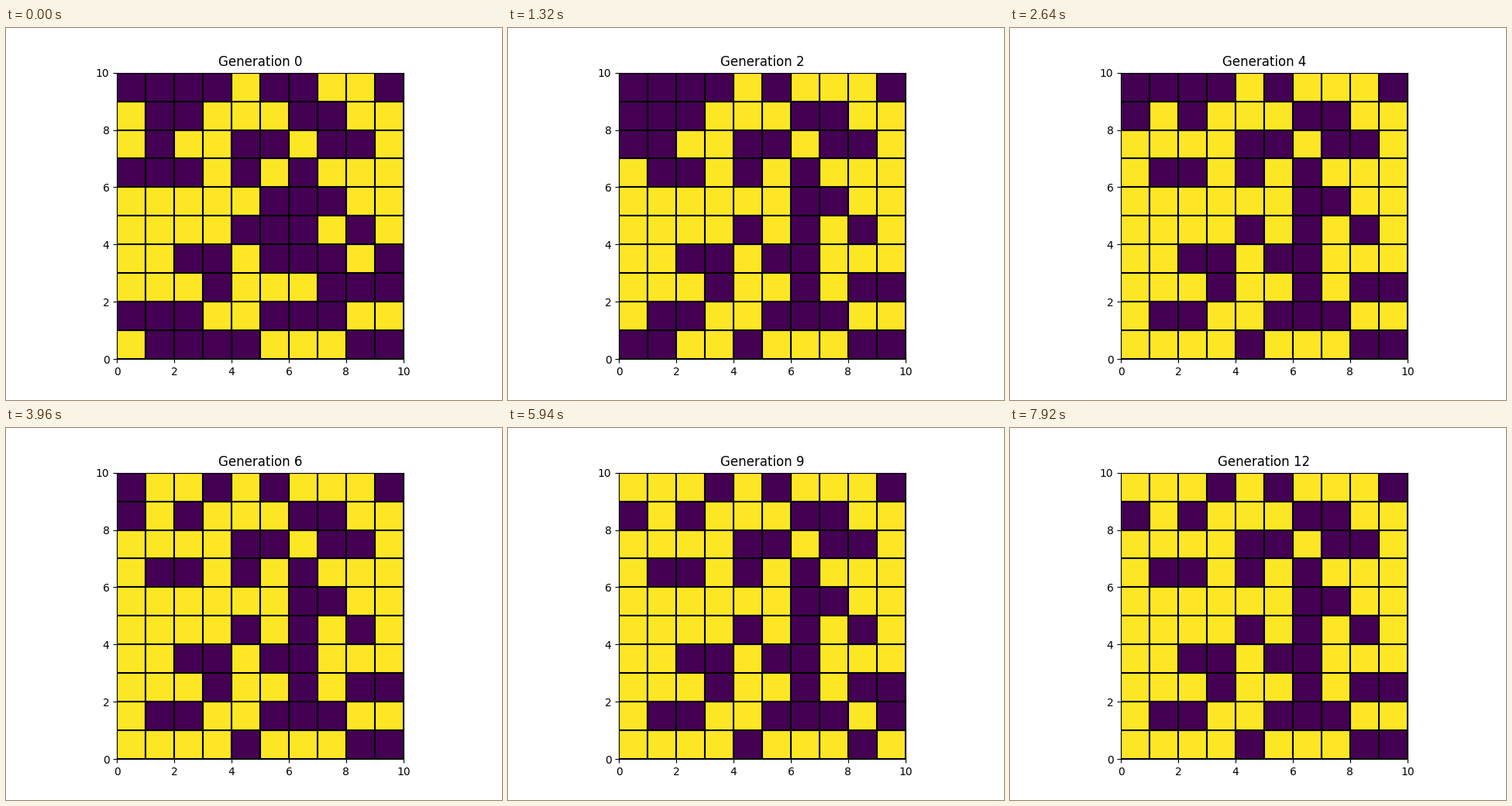
Recreate the animation shown at these times as a matplotlib script. Size 640 px wide and 480 px high, loop 8000 ms.

```python
import numpy as np
import matplotlib.pyplot as plt
from matplotlib.animation import FuncAnimation

LOOP_MS, STEP_MS, TICK_MS = 8000, 660, 20

# Top row first; "1" marks a live cell.
START = """
0000100110
1001110011
1011001001
0001010111
1111100011
1111000101
1100100010
1110111000
0001100011
1000011100
""".split()


def evolve(grid):
    """Cells die below two neighbours, are born at two, and otherwise persist."""
    rows, cols = grid.shape
    padded = np.pad(grid, 1)
    neighbours = sum(
        padded[r:r + rows, c:c + cols]
        for r in range(3) for c in range(3) if (r, c) != (1, 1)
    )
    return np.where(neighbours < 2, 0, np.where(neighbours == 2, 1, grid))


generations = [np.array([[int(cell) for cell in row] for row in reversed(START)])]
while len(generations) * STEP_MS < LOOP_MS:
    generations.append(evolve(generations[-1]))

fig, ax = plt.subplots(figsize=(6.4, 4.8), dpi=100)
mesh = ax.pcolormesh(generations[0], cmap="viridis", vmin=0, vmax=1,
                     edgecolors="black", linewidth=1.5, antialiased=True)
ax.set_aspect("equal")
title = ax.set_title("Generation 0")


def update(frame):
    index = frame * TICK_MS // STEP_MS
    mesh.set_array(generations[index])
    title.set_text(f"Generation {index}")
    return mesh, title


animation = FuncAnimation(fig, update, frames=LOOP_MS // TICK_MS,
                          interval=TICK_MS, repeat=True, repeat_delay=0)
plt.show()
```
